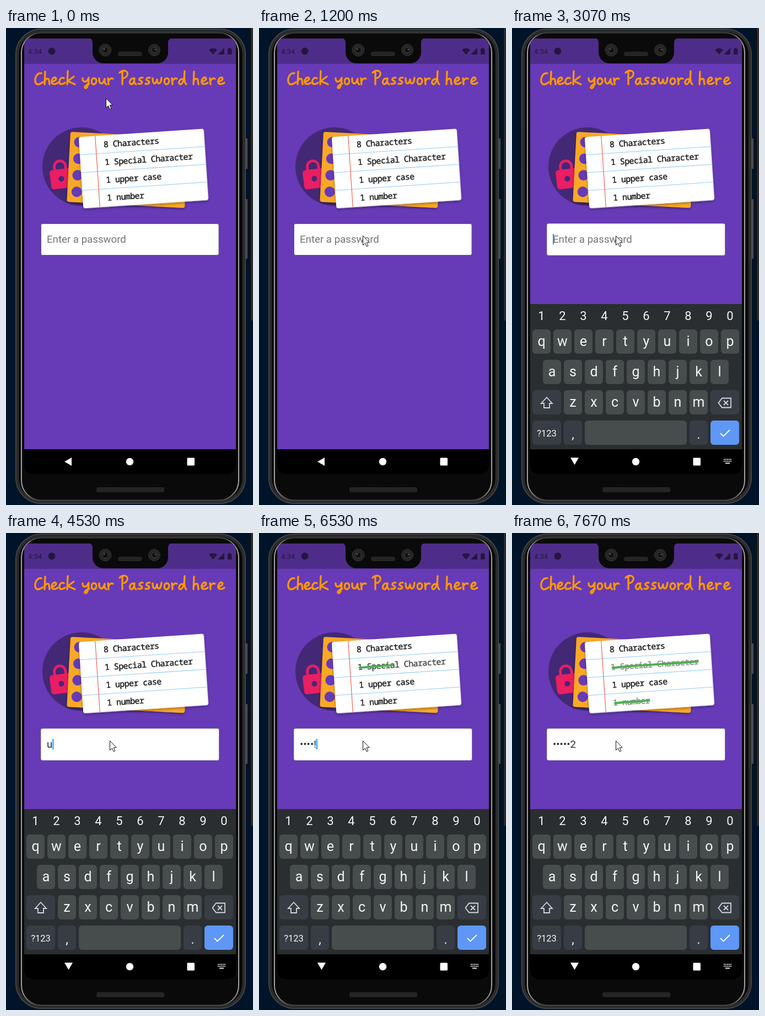
These frames come from a looping animation (448 px wide and 864 px high, 8000 ms). An HTML page:

```html
<!DOCTYPE html>
<html lang="en">
<head>
<meta charset="utf-8">
<title>Password checker</title>
<style>
  html, body { margin: 0; width: 100%; height: 100%; overflow: hidden; background: #001429; }
  svg { display: block; }
  text { font-family: Roboto, sans-serif; white-space: pre; }
  #rows text { font: 500 15px "Noto Sans Mono", monospace; letter-spacing: -.6px; stroke-width: .45; }
  #keys text { text-anchor: middle; fill: #f4f5f5; }
</style>
</head>
<body>
<svg width="448" height="864" viewBox="0 0 448 864">
  <defs>
    <clipPath id="screen"><rect x="33" y="19" width="384" height="789" rx="12"/></clipPath>
    <linearGradient id="rim">
      <stop offset="0" stop-color="#a2a2a2"/><stop offset=".07" stop-color="#444"/>
      <stop offset=".93" stop-color="#444"/><stop offset="1" stop-color="#a2a2a2"/>
    </linearGradient>
    <pattern id="mesh" width="3" height="3" patternUnits="userSpaceOnUse">
      <rect width="3" height="3" fill="#1c1c1c"/><circle cx="1.5" cy="1.5" r=".9" fill="#383838"/>
    </pattern>
    <filter id="shade" x="-10%" y="-10%" width="120%" height="125%">
      <feDropShadow dx="0" dy="2" stdDeviation="2" flood-opacity=".4"/>
    </filter>
  </defs>

  <!-- phone body -->
  <path d="M443 0h5v530h-5z" fill="#2b2b2b"/><path d="M443.5 0v530" stroke="#0a0a0a"/>
  <path d="M434 200h4v55h-4zM434 310h4v108h-4z" fill="#4a4d50"/>
  <rect x="18" y="2" width="416" height="859" rx="46" fill="#262626" stroke="#444" stroke-width="2"/>
  <rect x="22" y="6" width="408" height="851" rx="42" fill="#0a0a0a" stroke="#303030" stroke-width="2"/>
  <rect x="28" y="8.5" width="394" height="847" rx="36" fill="#0a0a0a" stroke="url(#rim)" stroke-width="2"/>
  <rect x="164" y="832" width="123" height="9" rx="3" fill="url(#mesh)"/>

  <g clip-path="url(#screen)">
    <path d="M33 19h384v789H33z" fill="#673ab7"/>
    <path d="M33 19h384v46H33z" fill="#4e2d8a"/>
    <g fill="#25163f">
      <text x="40" y="47" font-size="13">4:34</text>
      <circle cx="83" cy="42" r="6.5"/>
      <path d="M368 39.500q7.500-6 15 0L375.500 48zM396 36v12H384zM402 37.500h2V36h3v1.500h2.500V48H402z"/>
    </g>
    <g id="title" role="img" aria-label="Check your Password here" fill="none" stroke="#ff9800"
       stroke-width="3.300" stroke-linecap="round" stroke-linejoin="round"/>

    <!-- illustration -->
    <circle cx="137" cy="251" r="71" fill="#432876"/>
    <path transform="translate(100.500 273) rotate(-7) scale(2.500) translate(-12 -15)" fill="#e91e63"
      d="M18 8h-1V6c0-2.760-2.240-5-5-5S7 3.240 7 6v2H6c-1.100 0-2 .9-2 2v10c0 1.100.9 2 2 2h12c1.100 0 2-.9 2-2V10c0-1.100-.9-2-2-2zm-6 9a2 2 0 1 1 0-4 2 2 0 0 1 0 4zm3.100-9H8.900V6a3.100 3.100 0 0 1 6.200 0z"/>
    <g transform="translate(117 188) rotate(3)">
      <rect width="214" height="127" rx="4" fill="#f9a825" filter="url(#shade)"/>
      <path d="M17 18v91" stroke="#673ab7" stroke-width="19" stroke-linecap="round" stroke-dasharray="0 30"/>
    </g>
    <g transform="translate(131.800 197.500) rotate(-3.800)">
      <rect width="227.300" height="129.500" rx="4" fill="#fff" filter="url(#shade)"/>
      <path d="M0 32.300h227.300M0 64.600h227.300M0 96.900h227.300" stroke="#90caf9"/>
      <path d="M30 0v129.500" stroke="#f44336"/>
      <g id="rows"></g>
    </g>

    <!-- input -->
    <rect id="field" fill="#fff" rx="3"/>
    <text id="entry" x="74" y="389" font-size="18.67"></text>
    <rect id="caret" y="373" width="2" height="19" fill="#2196f3"/>

    <g id="keys"><path d="M33 500h384v263H33z" fill="#2a2e30"/></g>

    <!-- navigation bar -->
    <path d="M33 763h384v45H33z"/>
    <g fill="#fff">
      <path id="back" d="M106 785.500L119 778V793z"/>
      <circle cx="224.500" cy="785.500" r="6.700"/>
      <rect x="328.500" y="778.500" width="13.500" height="14" rx="1.500"/>
      <g id="imeIcon" fill="none" stroke="#fff" stroke-width="1.800">
        <path d="M384 781.500h14M384 784.800h14" stroke-dasharray="1.800 1.200"/><path d="M387 788.300h8"/>
      </g>
    </g>
  </g>

  <!-- notch -->
  <path d="M149 18a8 8 0 0 1 8 8v18a20 20 0 0 0 20 20h97a20 20 0 0 0 20-20V26a8 8 0 0 1 8-8z" fill="#0a0a0a"/>
  <g fill="#242424" stroke="#333">
    <circle cx="180" cy="40" r="11"/><circle cx="269" cy="40" r="10.500"/>
    <g fill="#111" stroke="#444"><circle cx="180" cy="40" r="5.500"/><circle cx="269" cy="40" r="5"/></g>
  </g>
  <g fill="#665f55"><circle cx="178" cy="38" r="1.500"/><circle cx="271" cy="39" r="1.300"/></g>
  <rect x="203" y="43" width="44" height="8" rx="4" fill="url(#mesh)"/>

  <path id="pointer" d="M.5.5V17.500l4-3.800 2.700 6.200 2.700-1.200-2.600-6h5z" fill="#fff" stroke="#111"/>
</svg>
<script>
const $ = id => document.getElementById(id);

function add(parent, tag, attrs, text) {
  const el = document.createElementNS('http://www.w3.org/2000/svg', tag);
  for (const k in attrs) el.setAttribute(k, attrs[k]);
  if (text) el.textContent = text;
  return parent.appendChild(el);
}

// Handwritten heading: pen strokes per letter
const glyphs = {
  C: 'M12 83C4 82 0 91 1 98C3 106 10 103 15 99',
  h: 'M2 80L1 103M1 98C3 92 9 91 9 96L10 103',
  e: 'M1 98C6 98 11 94 8 91C4 89 0 95 1 100C3 104 9 103 12 100',
  c: 'M9 92C4 89 0 95 1 100C2 104 8 103 11 100',
  k: 'M2 79L1 103M13 89L2 97L15 103',
  y: 'M1 92C1 100 8 100 11 93M12 91C12 101 10 111 6 110C3 109 6 104 13 102',
  o: 'M5 92C0 93 0 103 5 103C12 102 11 91 5 92',
  u: 'M1 92C0 104 8 105 11 93C10 99 12 102 14 103',
  r: 'M1 92L2 103M2 97C4 93 7 91 10 93',
  P: 'M5 80L5 103M0 82C8 75 16 79 14 86C12 91 8 92 5 92',
  a: 'M9 93C2 90 -1 102 4 103C8 103 10 96 10 92C9 98 10 102 13 103',
  s: 'M9 91C4 90 1 94 4 96C10 98 9 103 1 102',
  w: 'M1 92C1 105 7 104 9 94C9 105 16 104 17 91',
  d: 'M10 94C3 91 -1 102 4 103C9 103 12 92 12 79C11 90 11 100 15 103'
};
const words = {
  Check: [52, 69, 82, 96, 110],
  your: [138, 154, 168, 184],
  Password: [206, 223, 239, 252, 265, 286, 300, 312],
  here: [339, 354, 369, 384]
};
for (const word in words)
  words[word].forEach((x, i) => add($('title'), 'path', { d: glyphs[word[i]], transform: `translate(${x} -1)` }));

// Requirements
const rules = ['8 Characters', '1 Special Character', '1 upper case', '1 number'].map((label, i) => {
  const y = 21.6 + 32.3 * i, w = 8.4 * label.length;
  return {
    text: add($('rows'), 'text', { x: 44, y }, label),
    line: add($('rows'), 'path', {
      d: `M46 ${y - 4}c${w * .3} -2 ${w * .6} 0 ${w - 2} -1`, pathLength: 1, 'stroke-dasharray': '1 2',
      fill: 'none', stroke: '#4caf50', 'stroke-width': 4
    })
  };
});

// Keyboard
function key(x, y, w, fill, label = '', size = 25, dy = 30) {
  add($('keys'), 'rect', { x, y, width: w, height: 44, rx: 6, fill });
  add($('keys'), 'text', { x: x + w / 2, y: y + dy, 'font-size': size }, label);
}
const light = '#474c4d', dark = '#383d45';
[...'1234567890'].forEach((d, i) => add($('keys'), 'text', { x: 53.5 + 38 * i, y: 529, 'font-size': 22 }, d));
[['qwertyuiop', 37, 546], ['asdfghjkl', 56, 601], ['zxcvbnm', 94, 656]].forEach(([row, x, y]) =>
  [...row].forEach((c, i) => key(x + 38 * i, y, 33, light, c)));
key(37, 656, 52, dark);
key(360, 656, 52, dark);
key(37, 711, 52, dark, '?123', 16.5, 29);
key(94, 711, 33, dark, ',', 23, 33);
key(132, 711, 185, light);
key(322, 711, 33, dark, '.', 23, 33);
key(360, 711, 52, '#5e97f6');
const icon = (d, stroke) => add($('keys'), 'path', { d, fill: 'none', stroke, 'stroke-width': 1.8 });
icon('M63 669l-10 11h5v8h10v-8h5z', '#d5d7d8');
icon('M381 670.5h16v17h-16l-6.500-8.500zM384 675l8 8m0-8l-8 8', '#d5d7d8');
icon('M378 734l5.500 5.500L395 728', '#fff');

// Timeline in steps of 1/15 s
const STEP = 1000 / 15, LOOP = 8000;
const typed = [[67, 'u'], [73, '•s'], [80, '••e'], [85, '•••r'], [97, '••••!'], [108, '•••••2']];
const blinks = [32, 35, 43, 49, 57, 64, 67, 92, 97, 104, 108, 115];

const clamp = v => Math.max(0, Math.min(1, v));
const show = (id, on) => $(id).setAttribute('visibility', on ? 'visible' : 'hidden');
const bezier = (u, a, b, c, d) =>
  a * (1 - u) ** 3 + 3 * b * u * (1 - u) ** 2 + 3 * c * u * u * (1 - u) + d * u ** 3;

function strike({ text, line }, p) {
  const g = 28 + 108 * p, ink = `rgb(${g},${g},${g})`;
  text.setAttribute('fill', ink);
  text.setAttribute('stroke', ink);
  line.setAttribute('stroke-dashoffset', 1 - p);
  line.setAttribute('visibility', p ? 'visible' : 'hidden');
}

function pointerAt(n) {
  if (n < 6) {
    const u = clamp(n / 2);
    return [181 + 142 * u, 127 + 240 * u];
  }
  const u = clamp((n - 5) / 13);
  return [bezier(u, 323, 190, 25, 188), bezier(u, 367, 890, 840, 376)];
}

function draw(now) {
  const n = Math.floor((now % LOOP) / STEP + .1);
  $('pointer').setAttribute('transform', `translate(${pointerAt(n)})`);

  const focus = n >= 30, field = focus
    ? { x: 63, y: 354, width: 323.5, height: 58, stroke: '#6f5b94', 'stroke-width': .7 }
    : { x: 63.5, y: 354.5, width: 322.5, height: 57, stroke: '#665885', 'stroke-width': 1 };
  for (const k in field) $('field').setAttribute(k, field[k]);

  const value = typed.reduce((s, [at, v]) => n >= at ? v : s, '');
  const entry = $('entry');
  entry.textContent = value || 'Enter a password';
  entry.setAttribute('fill', value ? '#2b2b2b' : '#757575');
  $('caret').setAttribute('x', 74 + (value ? entry.getComputedTextLength() : 0));
  show('caret', blinks.filter(b => b <= n).length % 2);

  $('back').setAttribute('transform', `rotate(${-90 * clamp((n - 34) / 4)} 112.6 784.6)`);
  show('imeIcon', n >= 31);
  show('keys', n >= 46);

  rules.forEach((rule, i) =>
    strike(rule, i === 1 ? clamp((n - 96) / 5) : i === 3 ? clamp((n - 107) / 6) : 0));
}

const start = performance.now();
function tick() {
  draw(performance.now() - start);
  requestAnimationFrame(tick);
}
tick();
</script>
</body>
</html>
```
